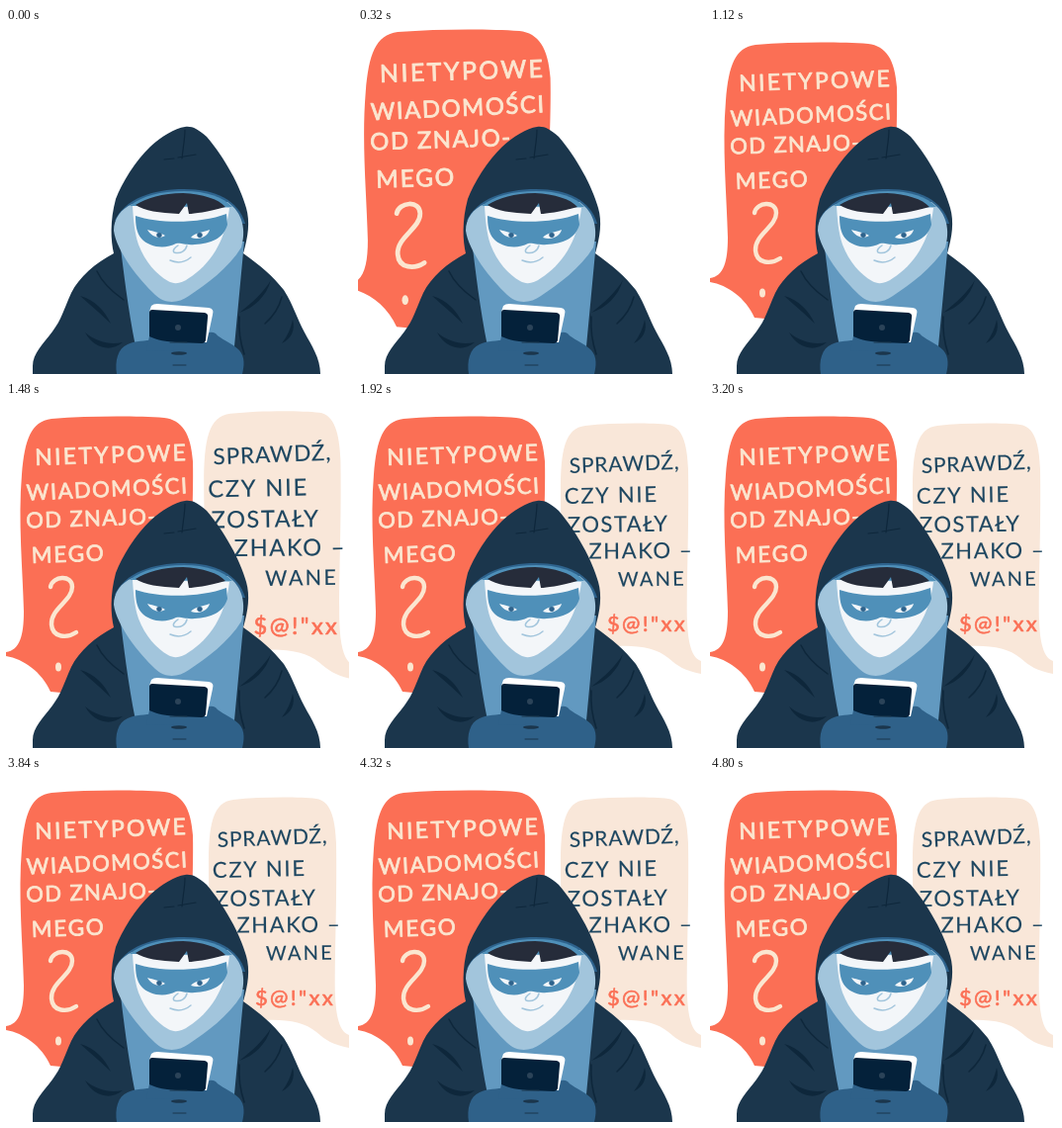
An HTML page with a canvas that plays this animation: 350x350 px, repeating every 4840 ms.

```html
<!DOCTYPE html>
<html lang="pl">
<head>
<meta charset="utf-8">
<title>Nietypowe wiadomości</title>
<style>
html, body { margin: 0; width: 100%; height: 100%; overflow: hidden; background: #fff; }
canvas { display: block; width: 350px; height: 350px; }
</style>
</head>
<body>
<canvas id="stage"></canvas>
<script>
const SIZE = 350, LOOP = 4840;
const RISE = 360, SETTLE = 160, PEAK = 1.08;
const QUESTION_AT = -40, ADVICE_AT = 1140;
const canvas = document.getElementById('stage');
const ctx = canvas.getContext('2d');
const ratio = window.devicePixelRatio || 1;
canvas.width = canvas.height = SIZE * ratio;

const C = {
  coral: '#fb6f55', cream: '#fbe6d0', sand: '#f9e7d9', ink: '#1d4660',
  coat: '#1b364c', fold: '#0e273b', rim: '#2e638d', scarf: '#a2c5dc',
  shirt: '#6299c0', mask: '#4f90b9', hand: '#2f6189', hair: '#262c3a',
  phone: '#04213a', face: '#f3f6f9', white: '#fff'
};

function fill(color, d) {
  ctx.fillStyle = color;
  ctx.fill(new Path2D(d));
}

function line(color, width, d) {
  ctx.strokeStyle = color;
  ctx.lineWidth = width;
  ctx.stroke(new Path2D(d));
}

function dot(color, x, y, rx, ry = rx) {
  ctx.fillStyle = color;
  ctx.beginPath();
  ctx.ellipse(x, y, rx, ry, 0, 0, Math.PI * 2);
  ctx.fill();
}

function write(text, x, y, size, gap, tilt, color, weight) {
  ctx.save();
  ctx.translate(x, y);
  ctx.rotate(tilt * Math.PI / 180);
  ctx.font = `${size}px Lato, "Open Sans", sans-serif`;
  ctx.letterSpacing = gap + 'px';
  ctx.fillStyle = ctx.strokeStyle = color;
  ctx.lineWidth = weight;
  ctx.fillText(text, 0, 0);
  ctx.strokeText(text, 0, 0);
  ctx.restore();
}

function smooth(u) {
  u = Math.min(1, Math.max(0, u));
  return u * u * (3 - 2 * u);
}

// Grow past full size, then ease back.
function popScale(t) {
  return PEAK * smooth(t / RISE) - (PEAK - 1) * smooth((t - RISE) / SETTLE);
}

function pop(t, cx, cy, draw) {
  const s = popScale(t);
  if (s <= 0) return;
  ctx.save();
  ctx.translate(cx, cy);
  ctx.scale(s, s);
  ctx.translate(-cx, -cy);
  draw();
  ctx.restore();
}

function question() {
  fill(C.coral, `M0 253 C14 251 18 236 18 212 C17 170 12 120 16 73
    C19 38 25 20 46 17 C85 14 130 14 160 16 C178 18 187 32 189 60
    C190 100 186 170 185 200 L120 300 L45 293 C36 273 18 260 0 257 Z`);
  const say = (text, x, y, size, gap, tilt) => write(text, x, y, size, gap, tilt, C.cream, 0.8);
  say('NIETYPOWE', 29.5, 64, 23, 2.3, -1.8);
  say('WIADOMOŚCI', 21, 99.5, 22, 1.5, -2.6);
  say('OD ZNAJO-', 20.5, 127.5, 22, 1.4, -1.8);
  say('MEGO', 26, 163, 22.5, 1.7, -2);
  line(C.cream, 4.4, 'M45 187 C47 176 67 174 67 187 C67 201 45 209 46 225 C47 239 62 239 71 233');
  dot(C.cream, 53, 268, 3, 4.5);
}

function advice() {
  fill(C.sand, `M205 90 C205 50 209 26 230 24 C258 21 295 21 314 23
    C328 25 333 42 334 68 C335 130 332 190 333 222 C334 248 339 259 347 262
    L347 275 C331 272 323 267 314 259 C302 249 284 246 262 247
    L215 247 C207 200 205 130 205 90 Z`);
  const say = (text, x, y, size, gap, tilt) => write(text, x, y, size, gap, tilt, C.ink, 0.15);
  say('SPRAWDŹ,', 214, 72, 21, 0.8, -2.2);
  say('CZY NIE', 209, 103, 22, 1.7, -1.2);
  say('ZOSTAŁY', 212, 132, 22, 1.5, -0.8);
  say('ZHAKO –', 233.5, 158.5, 22, 1.6, -0.4);
  say('WANE', 263, 186.5, 20, 2.2, -0.8);
  write('$@!"xx', 252, 232, 22, 2.3, 0, C.coral, 0.6);
}

function coat() {
  fill(C.coat, `M181 100 C171 101 157 110 146 120 C131 134 117 157 111 173
    C105 195 106 215 109 228 C90 238 74 252 66 268 C58 286 56 295 47 307
    C38 319 27 329 27 342 L27 350 L318 350 C318 334 309 321 302 308
    C294 293 291 281 281 265 C270 251 257 240 240 228
    C245 211 247 196 243 182 C237 160 221 131 203 110 C194 102 188 99 181 100 Z`);
  line(C.fold, 1.2, `M181 103 C181 113 179 121 178 132 M160 133 L170 132
    M174 131 L192 128`);
  line(C.fold, 1.5, `M92 246 C98 259 109 268 119 275 M279 272 C276 284 270 292 262 299
    M236 292 C235 306 237 318 241 330`);
  fill(C.fold, `M75 271 C90 275 100 286 106 299 C97 290 87 282 75 271 Z
    M80 308 C91 317 104 321 118 318 C105 329 88 323 80 308 Z
    M268 255 C263 272 251 283 236 288 C250 277 260 268 268 255 Z
    M290 295 C293 306 288 315 279 319 C285 311 288 304 290 295 Z`);
}

function face() {
  fill(C.shirt, 'M115 215 C119 246 123 282 131 322 L231 322 L241 216 Z');
  fill(C.rim, 'M110 195 C120 173 148 163 180 163 C212 163 235 174 242 198 Z');
  fill(C.scarf, `M128 178 C116 183 109 193 109 205 C112 226 134 254 151 270
    C160 279 174 279 185 271 C203 259 225 243 238 222
    C243 205 240 187 224 176 Z`);
  fill(C.mask, 'M125 180 C137 170 157 165 180 165 C202 165 220 171 229 181 Z');
  fill(C.face, `M128 180 C129 195 130 207 134 219 C141 237 152 249 164 256
    C171 260 178 258 185 253 C206 240 222 216 226 182 Z`);
  fill(C.hair, `M131 179 C142 172 158 167 179 167 C199 168 215 173 222 181
    C204 186 190 188 185 188 L183 177 L175 188 C155 187 140 185 131 179 Z`);
  fill(C.mask, `M131 190 C154 198 197 198 223 188 L224 199 C220 213 207 218 191 219
    C181 220 178 217 172 218 C161 224 145 222 137 213 C132 207 131 199 131 190 Z`);

  fill(C.face, 'M143 204 C149 206 157 207 161 210 C155 214 147 211 143 204 Z');
  fill(C.face, 'M187 212 C191 207 199 207 206 204 C204 211 196 215 187 212 Z');
  dot(C.rim, 155, 209.5, 2.7, 2.4);
  dot(C.rim, 196, 209.5, 2.7, 2.4);
  line(C.scarf, 1.5, `M183 220 C182 225 177 229 170 227 C168 225 171 222 174 220
    M166 235 C173 238 181 237 187 232`);
}

function phone() {
  fill(C.hand, `M112 350 C110 337 113 324 123 320 C131 316 140 317 150 315
    L201 315 C203 308 207 306 212 309 C217 315 228 318 236 326
    C242 333 241 342 239 350 Z`);
  fill(C.white, `M145 287 L147 281 Q149 279 153 279 L205 283 Q211 284 209 290
    L203 318 L200 318 Z`);
  fill(C.phone, `M148 285 L201 288 Q205 289 204 293 L202 316 Q201 319 198 319
    L149 317 Q145 317 145 313 L145 288 Q145 285 148 285 Z`);
  dot('#2b4358', 174, 303, 3);
  fill(C.hand, 'M145 312 C153 316 163 317 171 318 L169 327 L142 326 Z');
  line(C.coat, 1, 'M166 318 L183 318 M169 341 L182 341');
  dot(C.coat, 175, 329, 8, 1.7);
}

function render(t) {
  ctx.setTransform(ratio, 0, 0, ratio, 0, 0);
  ctx.fillStyle = C.white;
  ctx.fillRect(0, 0, SIZE, SIZE);
  ctx.lineCap = ctx.lineJoin = 'round';

  pop(t - QUESTION_AT, 119, 178, question);
  ctx.save();
  ctx.beginPath();
  ctx.rect(0, 0, 347, SIZE);
  ctx.clip();
  pop(t - ADVICE_AT, 272, 195, advice);
  ctx.restore();

  coat();
  face();
  phone();
}

const start = performance.now();
function frame() {
  render((performance.now() - start) % LOOP);
  requestAnimationFrame(frame);
}
frame();
</script>
</body>
</html>
```
